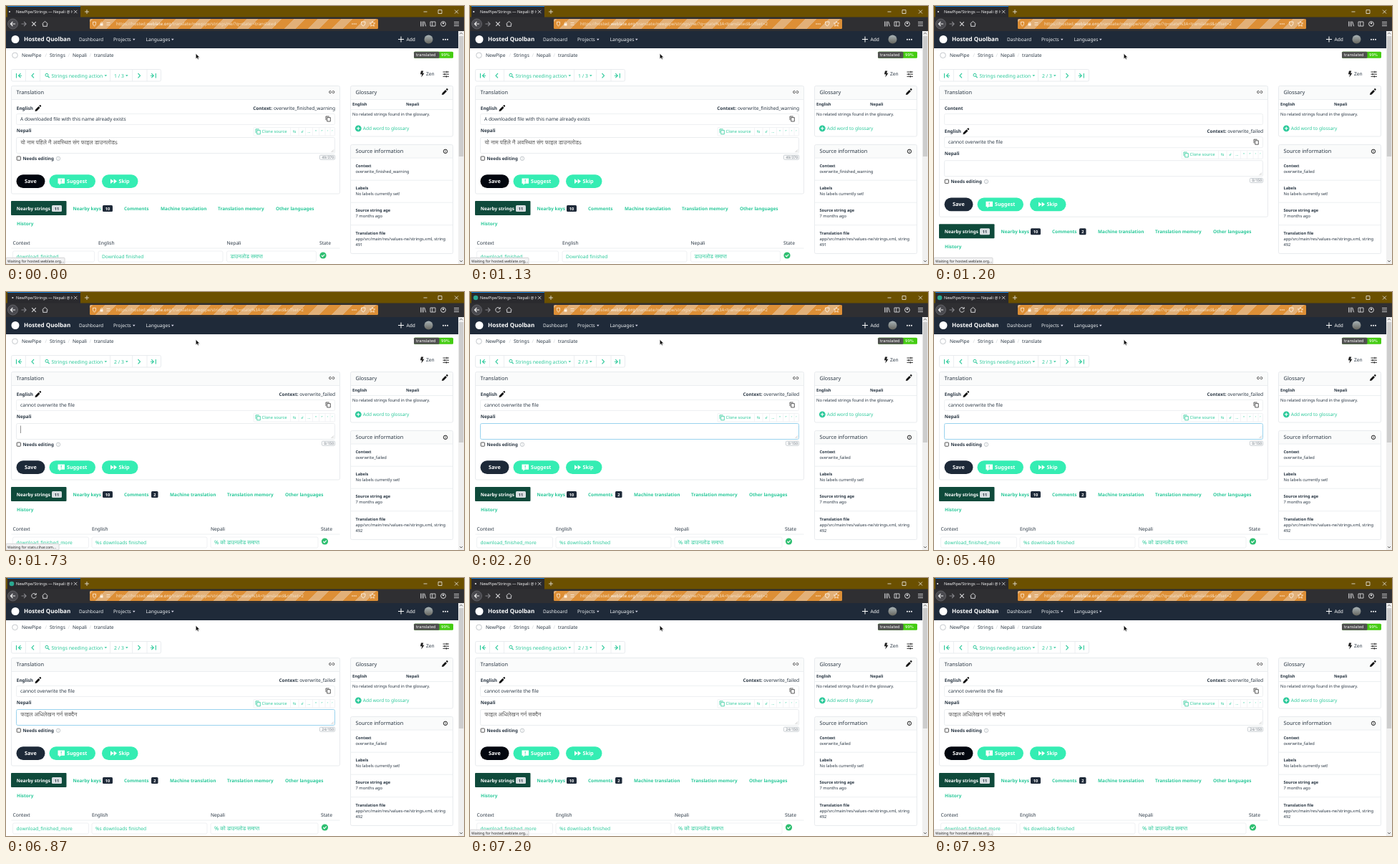
These frames come from a looping animation (640x360 px, 8 s). An HTML page:

```html
<!DOCTYPE html>
<html lang="en">
<head>
<meta charset="utf-8">
<title>Translation editor</title>
<style>
  html, body { margin: 0; width: 100%; height: 100%; overflow: hidden; background: #fff; }
  svg { display: block; width: 640px; height: 360px; }
  text { font-family: "Noto Sans", "Open Sans", sans-serif; text-rendering: geometricPrecision; white-space: pre; }
</style>
</head>
<body>
<svg id="stage" viewBox="0 0 640 360"></svg>
<script>
const LOOP = 8000;
const INK = '#2a3744', NAVY = '#1f2a39', GREEN = '#2bc99a', MINT = '#35edb3', LINE = '#e8ebee';
const BODY = 6.65, BOLD = 6.4, SMALL = 5.78;
const stage = document.getElementById('stage');

const text = (x, y, s, size = BODY, fill = INK, weight = 400, more = '') =>
  `<text x="${x}" y="${y}" font-size="${size}" fill="${fill}" font-weight="${weight}" ${more}>${s}</text>`;
const bold = (x, y, s, fill = INK, size = BOLD) => text(x, y, s, size, fill, 600);
const rect = (x, y, w, h, fill, r = 0, stroke = 'none') =>
  `<rect x="${x}" y="${y}" width="${w}" height="${h}" rx="${r}" fill="${fill}" stroke="${stroke}"/>`;
const frame = (x, y, w, h, r = 2, stroke = LINE) => rect(x, y, w, h, 'none', r, stroke);
const circle = (x, y, r, fill, stroke = 'none') =>
  `<circle cx="${x}" cy="${y}" r="${r}" fill="${fill}" stroke="${stroke}"/>`;
const path = (d, stroke = INK, width = 1, fill = 'none') =>
  `<path d="${d}" stroke="${stroke}" stroke-width="${width}" fill="${fill}"/>`;
const shape = (d, fill) => path(d, 'none', 0, fill);
const hline = (x, y, w) => path(`M${x} ${y}h${w}`, LINE, .8);
const arrowDown = (x, y, fill) => shape(`M${x} ${y}h3.6l-1.8 2.1z`, fill);
const pencil = (x, y) => shape(`M${x - 4} ${y + 4}l.6-2.6 4.4-4.4 2 2-4.4 4.4zM${x + 1.7} ${y - 3.7}l1-1q.8-.5 1.6.4.8.8.2 1.4l-1 1z`, '#111');
const copyIcon = (x, y, color) =>
  path(`M${x - 3} ${y + 2}v-5.2h4.6M${x - 1.3} ${y - 1.6}h4.6v5.4h-4.6z`, color, .8);
const info = (x, y, color) => circle(x, y, 2.7, 'none', color) + rect(x - .4, y - .4, .8, 1.8, color) + rect(x - .4, y - 1.5, .8, .7, color);
const badge = (x, y, w, s, fill, ink) =>
  rect(x, y, w, 9, fill, 1.5) + text(x + w / 2, y + 6.7, s, 5.6, ink, 600, 'text-anchor="middle"');
const panel = (x, y, w, h, head, title) =>
  rect(x, y, w, head, '#fafbfb', 2) + frame(x, y, w, h) + hline(x, y + head, w) + text(x + 7, y + 11.5, title, 7.4, INK, 500);

function browser(s) {
  const pale = '#d8d8da', cream = '#fff2e2';
  const reload = path('M41.6 22.8a3.3 3.3 0 1 0 .6 3M42.2 21v2.4h-2.5', pale);
  const stop = path('M36.2 22.2l5.6 5.6m0-5.6l-5.6 5.6', pale, 1.1);
  const query = s.offset ? '%3A&lt;translated&amp;offset=2' : ':&lt;translated';
  return rect(0, 0, 640, 16, '#6b5000') + rect(2, 0, 102, 16, '#2a2a2e') + rect(2, 0, 102, 1, '#1583e0') +
    (s.loading ? circle(s.dot, 8, 1.1, '#e8e8ea') : circle(8, 8, 3.3, '#2aa890')) +
    `<g clip-path="url(#tab)">${text(14, 10.2, 'NewPipe/Strings — Nepali @ Hosted', 5.6, '#f4f4f4')}</g>` +
    path('M95 5.8l4.4 4.4m0-4.4l-4.4 4.4', '#ddd', .8) + path('M110 8h6m-3-3v6', '#eee', .8) +
    path('M583.5 8h5M604 5.5h5v5h-5zM627 5.5l5 5m0-5l-5 5', '#eee', .8) +
    rect(0, 15.5, 640, 19.5, '#2f2f32') +
    circle(9.5, 25, 7, '#4a4a4f', '#606065') +
    path('M13 25H6.4m3-3l-3 3 3 3', '#eee', 1.1) + path('M21.5 25h6.6m-3-3l3 3-3 3', '#85858a', 1.1) +
    (s.loading ? stop : reload) + path('M50.5 25l4-3.6 4 3.6M51.7 25v3.3h5.6v-3.3', pale) +
    rect(117, 18, 403, 14, 'url(#stripes)', 1.5) +
    path('M121.5 22.3h4v2.5q0 2.2-2 3.2-2-1-2-3.2z', cream, .8) +
    rect(131.5, 24.2, 4, 3.4, cream, .4) + path('M132.3 24.4v-1.3q1.2-1.7 2.4 0v1.3', cream, .7) +
    path('M140.5 23.5h5m-5 2.8h5', cream, .8) +
    text(154, 27.3, `https://hosted.<tspan fill="#fffaf2">weblate.org</tspan>/translate/newpipe/strings/ne/?q=state${query}`, 6.12, '#f6e3c8') +
    [484, 486.5, 489].map(x => circle(x, 25, .8, cream)).join('') +
    path('M496.5 22h5.4v2.6q-.4 2.4-2.7 3.4-2.3-1-2.7-3.4z', cream, .9) +
    path('M512 21.3l1.1 2.4 2.6.2-2 1.7.7 2.6-2.4-1.3-2.4 1.3.7-2.6-2-1.7 2.6-.2z', cream, .8) +
    path('M579.5 21.5v7m2-7v7m2-7v7m1.2-6.8l2 6.6M593 22h7v6h-7zm2.8 0v6', pale, .9) +
    circle(611, 25, 3.4, 'none', pale) + circle(611, 24, 1.2, pale) +
    path('M626 22.4h7m-7 2.6h7m-7 2.6h7', pale, .9);
}

function siteHeader() {
  const crumbs = [[22, 'NewPipe'], [61, 'Strings'], [93, 'Nepali'], [123, 'translate']];
  const sans = 'style="font-family:\'DejaVu Sans\',sans-serif"';
  return rect(0, 35, 632, 24, NAVY) + circle(13, 46.5, 5.5, '#fff') +
    bold(25, 49.3, 'Hosted Quolban', '#fff', 8.1) +
    text(102, 49, 'Dashboard', 6.6, '#eef1f3') + text(150, 49, 'Projects', 6.6, '#eef1f3') + arrowDown(177, 45.8, '#dde') +
    text(195.5, 49, 'Languages', 6.6, '#eef1f3') + arrowDown(231, 45.8, '#dde') +
    path('M548 46.5h8m-4-4v8', '#fff', 1) + text(559.5, 49, 'Add', 6.6, '#fff') +
    circle(590.5, 46.5, 6, 'url(#avatar)') +
    [611, 614, 617].map(x => circle(x, 46.7, 1, '#fff')).join('') +
    rect(632, 35, 8, 325, '#f0f0f0') + rect(632.8, 42, 6.4, 168, '#cdcdcd') +
    path('M634 39.3l2-2 2 2M634 355l2 2 2-2', '#555', .9) +
    circle(12.5, 68.8, 3.8, '#fff', '#c4c8cc') +
    crumbs.map(([x, s], i) => text(x, 71.2, s) + (i ? text(x - 6.5, 71.2, '/', BODY, '#d0d4d8') : '')).join('') +
    rect(570, 63.7, 55, 9, '#4c1', 1.5) + rect(570, 63.7, 35.5, 9, '#505050', 1.5) +
    text(573, 70.2, 'translated', 5.4, '#fff', 400, sans) + text(608, 70.2, '99%', 5.4, '#fff', 400, sans);
}

function toolbar(s) {
  return frame(7.5, 88.5, 209, 16.5) + [27.5, 47.5, 145.5, 176.5, 197].map(x => path(`M${x} 88.5v16.5`, LINE, .8)).join('') +
    path('M14.5 94v6.4m6-6.2l-3 3 3 3m-3-3h4.5M39 94l-3 3.2 3 3.2M184.5 94l3 3.2-3 3.2M209.3 94v6.4m-6-6.2l3 3-3 3m3-3h-4.5', GREEN, 1.1) +
    circle(57, 96.3, 2, 'none', GREEN) + path('M58.5 98l2.2 2.2', GREEN, 1.1) +
    text(63.5, 99.5, 'Strings needing action', 6.8, GREEN, 500) + arrowDown(137.5, 96.2, GREEN) +
    text(151, 99.5, s.next ? '2 / 3' : '1 / 3', 6.8, GREEN, 500) + arrowDown(167, 96.2, GREEN) +
    shape('M580 90.5h3.2l-1 3.2h2.3l-4.2 5.8.9-4.2h-2.3z', '#222') + text(587, 97.3, 'Zen') +
    path('M610.5 92h8.5m-8.5 3.2h8.5m-8.5 3.2h8.5M616 90.7v2.6m-3 .6v2.6m2.3.6v2.6', '#222', .9);
}

function sidebar(s) {
  const facts = [
    [225, 'Context', s.context], [256, 'Labels', 'No labels currently set!'],
    [287, 'Source string age', '7 months ago'],
    [318.5, 'Translation file', 'app/src/main/res/values-ne/strings.xml, string']];
  return panel(481.5, 111.5, 143, 70.5, 19, 'Glossary') + pencil(613, 120) +
    bold(484, 139.3, 'English', INK, 5.7) + bold(559, 139.3, 'Nepali', INK, 5.7) + hline(481.5, 144.5, 143) +
    text(484, 153.3, 'No related strings found in the glossary.', SMALL) +
    circle(492.3, 170.8, 4.4, GREEN) + path('M489.9 170.8h4.8m-2.4-2.4v4.8', '#fff', 1.1) +
    text(498.8, 173.2, 'Add word to glossary', 6.5, GREEN) +
    panel(481.5, 193.5, 143, 152, 18.5, 'Source information') + info(614, 202.8, '#222') +
    facts.map(([y, k, v], i) => bold(488.5, y, k, INK, 5.6) + text(488.5, y + 8.2, v, SMALL) + (i ? hline(481.5, y - 12.8, 143) : '')).join('') +
    text(488.5, 335, s.next ? '492' : '491', SMALL);
}

function editor(s) {
  const chars = [[403, '⇆'], [414, '↲'], [423.5, '…'], [433, '“'], [441.5, '”'], [449.5, '‘'], [456, '’']];
  return bold(14.8, 145.3, 'English') + pencil(44.5, 143) +
    text(460, 145.3, `<tspan font-weight="600" font-size="${BOLD}">Context:</tspan> ${s.context}`, BODY, INK, 400, 'text-anchor="end"') +
    frame(14.5, 150.5, 445, 15, 2, '#eef0f2') + text(20, 160.3, s.next ? 'cannot overwrite the file' : 'A downloaded file with this name already exists') +
    copyIcon(450, 157.2, '#333') + bold(14.8, 175.8, 'Nepali') +
    frame(346, 169.5, 113.5, 11.5, 1, '#f0f2f4') +
    [397.5, 409, 418.5, 428.5, 437.5, 446, 453].map(x => path(`M${x} 169.5v11.5`, '#f0f2f4', .8)).join('') +
    copyIcon(352, 175, GREEN) + text(357.5, 177.3, 'Clone source', SMALL, GREEN) +
    chars.map(([x, c]) => text(x, 177, c, 5.4, GREEN, 400, 'text-anchor="middle"')).join('') +
    frame(14.5, 183.5, 445, 22, 2, s.focus ? '#9ad3ee' : '#eaedef') +
    path('M454.5 204l3.5-3.5m-1.5 3.5l1.5-1.5', '#aaa', .6) +
    text(20.5, 193, s.typed, 8.15, '#5a5a5a') + (s.caret ? rect(20.2, 186.5, .8, 10.5, '#777') : '') +
    rect(15.2, 210, 5.2, 5.2, '#fff', .6, '#555') + bold(23.5, 215, 'Needs editing', INK, 6.25) + info(73, 212.8, '#c3c8cd') +
    frame(s.counter.length > 5 ? 438.5 : 441.5, 208.2, s.counter.length > 5 ? 21 : 18, 6, 1, '#c9ced3') +
    text(458.3, 213.1, s.counter, 5.2, '#9aa1a8', 600, 'text-anchor="end"') +
    rect(14.5, 235.2, 40, 18.8, s.saving ? '#03070f' : '#1d2938', 9.4) + bold(26, 247, 'Save', '#fff', 7.2) +
    rect(60.5, 235.2, 64.5, 18.8, MINT, 9.4) + shape('M72.5 240.5h9.5v7.2h-5.4l-2.2 2.2v-2.2h-1.9z', '#fff') +
    path('M77.2 241.8v3m0 .8v1', MINT, 1) + bold(85, 247, 'Suggest', '#fff', 7.1) +
    rect(134, 235.2, 50.5, 18.8, MINT, 9.4) + shape('M146 241.3l4.4 3.3-4.4 3.3zm4.6 0l4.4 3.3-4.4 3.3z', '#fff') + bold(157.5, 247, 'Skip', '#fff', 7.2);
}

function nearby(s) {
  const shift = s.next ? 13 : 0;
  const tabs = [[165, 'Comments'], [216 + shift, 'Machine translation'], [296 + shift, 'Translation memory'], [377 + shift, 'Other languages']];
  const cols = s.next
    ? [[9.5, 106, 'Context', 'download_finished_more'], [120, 161, 'English', '%s downloads finished'], [286, 150, 'Nepali', '% को डाउनलोड समाप्त']]
    : [[9.5, 114, 'Context', 'download_finished'], [129, 174, 'English', 'Download finished'], [308.5, 125, 'Nepali', 'डाउनलोड समाप्त']];
  const check = s.next ? 445.5 : 443;
  const cellSize = head => head === 'Nepali' ? 7.6 : BODY;
  return rect(7, 272, 77.5, 20, '#0f4a3b', 1) + bold(14.8, 284.7, 'Nearby strings', '#fff') + badge(64, 278, 14, '11', '#d9dfe2', INK) +
    bold(93.5, 284.7, 'Nearby keys', GREEN) + badge(135, 278, 14, '10', NAVY, '#fff') +
    tabs.map(([x, t]) => bold(x, 284.7, t, GREEN)).join('') + (s.next ? badge(203, 278, 9.5, '2', NAVY, '#fff') : '') +
    bold(15, 305.7, 'History', GREEN) +
    cols.map(([x, w, head, cell]) => text(x, 333, head) + frame(x, 342, w, 15, 2, '#eff1f3') + text(x + 5, 351.6, cell, cellSize(head), GREEN)).join('') +
    text(s.next ? 440 : 438, 333, 'State') + hline(7.5, 338, 459) +
    circle(check, 348, 4.6, '#2fbf71') + path(`M${check - 2.2} 348l1.6 1.7 2.9-3.1`, '#fff', 1.1);
}

function page(s) {
  const content = s.unstyled ? bold(14.8, 145.3, 'Content') + frame(14.5, 150.5, 445, 15, 2, '#eef0f2') : '';
  const drop = s.unstyled ? 32.2 : 0;
  return panel(7.5, 111.5, 459, 150.5 + drop, 19, 'Translation') +
    path('M454 118.5h-.8a1.6 1.6 0 0 0 0 3.2h.8m2.4-3.2h.8a1.6 1.6 0 0 1 0 3.2h-.8m-2.8-1.6h3.2', '#333', .8) +
    content + `<g transform="translate(0 ${drop})">${editor(s)}${nearby(s)}</g>`;
}

const defs = `<defs>
  <linearGradient id="stripes" gradientUnits="userSpaceOnUse" x1="520" y1="32" x2="503.5" y2="15.5" spreadMethod="repeat">
    <stop offset=".5" stop-color="#dd8f36"/><stop offset=".5" stop-color="#e2b078"/></linearGradient>
  <linearGradient id="avatar" x2="0" y2="1"><stop stop-color="#a9b3b6"/><stop offset="1" stop-color="#66665f"/></linearGradient>
  <clipPath id="tab"><path d="M14 0h79.5v16h-79.5z"/></clipPath></defs>`;

function stateAt(t) {
  const next = t >= 1200, typed = t >= 6870, reloading = t >= 6930;
  const loading = t < 1930 || reloading;
  const blinkOn = t > 5930 || Math.floor((t - 1666) / 533.3) % 2 === 0;
  const sweep = 7.7 - 2.8 * Math.cos((reloading ? t - 6930 : t) / 1050 * 2 * Math.PI);
  return {
    next, loading,
    offset: t >= 930,
    unstyled: next && t < 1470,
    focus: t >= 1800 && !reloading,
    saving: !next || reloading,
    caret: t >= 1470 && !typed && blinkOn,
    dot: loading ? sweep : 0,
    context: next ? 'overwrite_failed' : 'overwrite_finished_warning',
    typed: typed ? 'फाइल अधिलेखन गर्न सक्दैन' : next ? '' : 'यो नाम पहिले नै अवस्थित संग फाइल डाउनलोडs',
    counter: typed ? '24/150' : next ? '0/150' : '49/370',
    status: !loading ? '' : t >= 1600 && t < 1930 ? 'stats.cihar.com' : 'hosted.weblate.org'
  };
}

function statusBar(host) {
  if (!host) return '';
  const width = host.length > 15 ? 82 : 74;
  return rect(0, 351.3, width, 8.7, '#f3f3f4', 1, '#d4d4d6') + text(2, 357.6, `Waiting for ${host}...`, 5.15, '#222');
}

const pointer = path('M265.3 66.5v7.2l1.7-1.5 1.1 2.4 1.2-.6-1.1-2.3h2.3z', '#fff', .4, '#111');

let shown = '';
function draw(now) {
  const s = stateAt(now % LOOP), key = JSON.stringify(s);
  if (key !== shown) {
    shown = key;
    stage.innerHTML = defs + page(s) + toolbar(s) + sidebar(s) + siteHeader() + browser(s) + statusBar(s.status) + pointer;
  }
  requestAnimationFrame(draw);
}
draw(performance.now());
</script>
</body>
</html>
```
